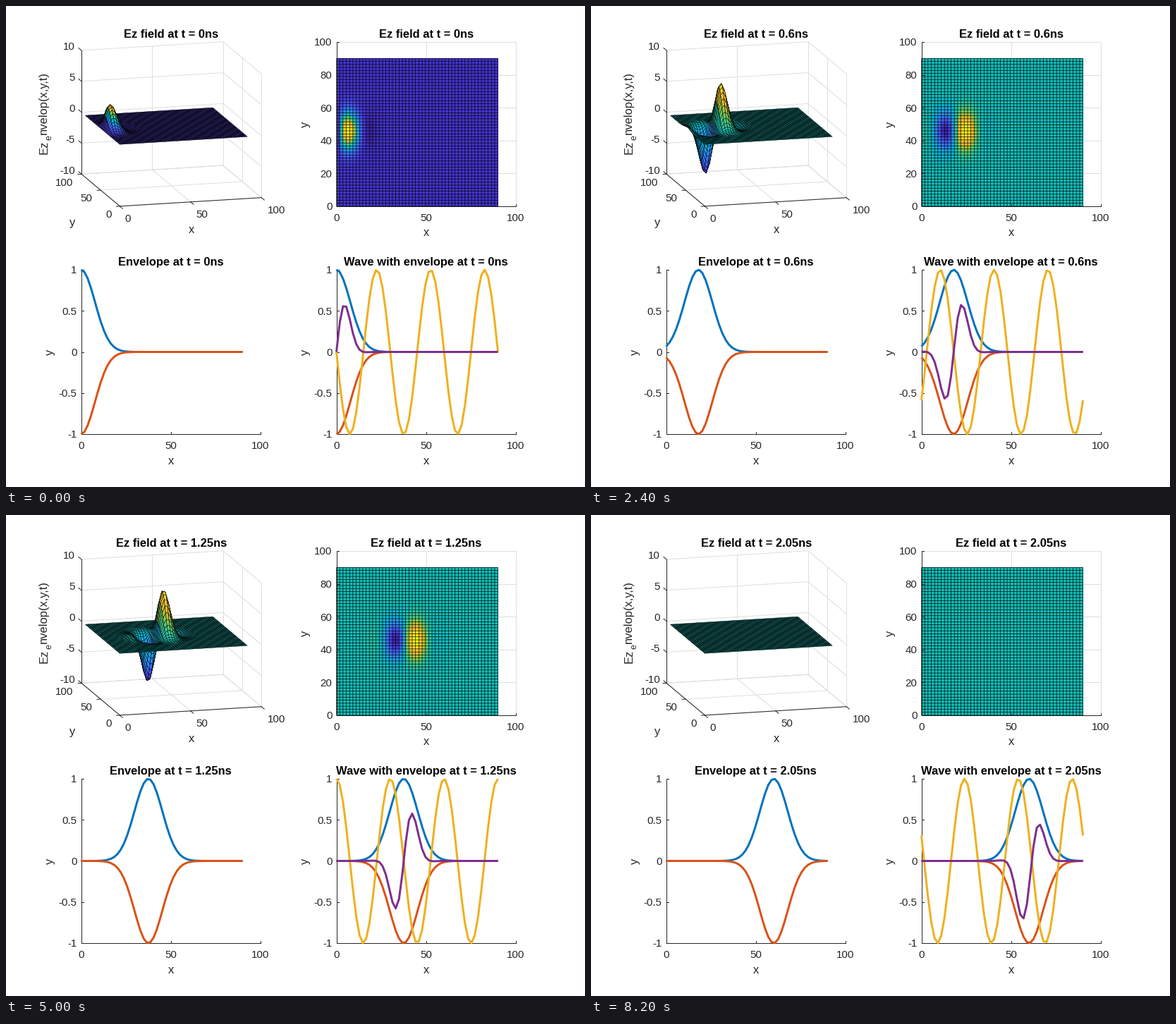
Write a matplotlib script that moves like this. It is 821x682 px and loops after 8.7 s.

```python
import numpy as np
import matplotlib.pyplot as plt
from matplotlib.animation import FuncAnimation
from matplotlib.collections import LineCollection, PolyCollection
from matplotlib.colors import LinearSegmentedColormap

W, H, DPI = 821, 682, 64
PT = 72 / DPI  # points per pixel
INK, GRID = "#262626", "#dedede"
BLUE, ORANGE, YELLOW, PURPLE = "#0072bd", "#d95319", "#edb120", "#7e2f8e"

STEPS, STEP_MS, LAST_MS, TICK_MS = 42, 200, 500, 100
SPEED, WAVELENGTH, WIDTH = 30, 30, 120
N = 50
x = np.linspace(0, 90, N)
X, Y = np.meshgrid(x, x)

parula = LinearSegmentedColormap.from_list("parula", [
    (0.242, 0.150, 0.660), (0.271, 0.215, 0.836), (0.281, 0.301, 0.941),
    (0.270, 0.389, 0.991), (0.196, 0.485, 0.989), (0.169, 0.570, 0.936),
    (0.125, 0.646, 0.888), (0.030, 0.708, 0.816), (0.070, 0.746, 0.725),
    (0.216, 0.784, 0.592), (0.391, 0.803, 0.435), (0.617, 0.788, 0.261),
    (0.820, 0.750, 0.154), (0.973, 0.730, 0.239), (0.989, 0.814, 0.189),
    (0.960, 0.901, 0.148), (0.977, 0.984, 0.081)])

plt.rcParams["font.family"] = "Liberation Sans"
fig = plt.figure(figsize=(W / DPI, H / DPI), dpi=DPI, facecolor="white")
ax = fig.add_axes([0, 0, 1, 1])
ax.set_xlim(0, W)
ax.set_ylim(H, 0)
ax.axis("off")


def segment(p, q, color=INK, z=2):
    ax.plot([p[0], q[0]], [p[1], q[1]], color=color, lw=PT, zorder=z)


def label(px, py, text, size=15, ha="center", **kw):
    kw.setdefault("color", INK)
    return ax.text(px, py, text, fontsize=size * PT, ha=ha, va="baseline",
                   rotation_mode="anchor", **kw)


def title(px, py):
    return label(px, py, "", 16.5, weight="bold", color="black")


class Panel:
    """Flat axes placed in pixel coordinates."""

    def __init__(self, left, top, ylim, yticks, grid=False):
        self.left, self.top, self.ylim = left, top, ylim
        self.w, self.h = 254.5, 233
        bottom, right = top + self.h, left + self.w
        for v in (0, 50, 100):
            px = self.px(v)
            if grid:
                segment((px, top), (px, bottom), GRID, 0)
            segment((px, bottom), (px, bottom - 3))
            label(px, bottom + 21, str(v))
        for v in yticks:
            py = self.py(v)
            if grid:
                segment((left, py), (right, py), GRID, 0)
            segment((left, py), (left + 3, py))
            label(left - 6, py + 5.4, f"{v:g}", ha="right")
        segment((left, top), (left, bottom))
        segment((left, bottom), (right, bottom))
        mid = left + self.w / 2
        label(mid, bottom + 42.5, "x", 16.5)
        label(left - 39.3, top + self.h / 2, "y", 16.5, rotation=90)
        self.title = title(mid, top - 6)

    def px(self, v):
        return self.left + np.asarray(v) * self.w / 100

    def py(self, v):
        lo, hi = self.ylim
        return self.top + (hi - np.asarray(v)) / (hi - lo) * self.h

    def line(self, color):
        return ax.plot([], [], color=color, lw=3 * PT, zorder=4,
                       solid_joinstyle="round", solid_capstyle="butt")[0]

    def plot(self, line, y):
        line.set_data(self.px(x), self.py(y))


def project(x, y, z):
    return (161.4 + 2.008 * x - 0.544 * y,
            196.2 - 0.122 * x - 0.456 * y - 8.77 * z)


def edge(p, q, color=INK, z=2):
    segment(project(*p), project(*q), color, z)


def tick(p, dx, dy):
    a, b = project(*p)
    segment((a, b), (a + dx, b + dy))


def draw_box():
    for v in (-10, -5, 0, 5, 10):
        edge((0, 100, v), (100, 100, v), GRID, 0)
        edge((100, 100, v), (100, 0, v), GRID, 0)
        tick((0, 100, v), -4, -3.4)
        a, b = project(0, 100, v)
        label(a - 9, b - 0.6, str(v), ha="right")
    for v in (0, 50, 100):
        edge((v, 0, -10), (v, 100, -10), GRID, 0)
        edge((v, 100, -10), (v, 100, 10), GRID, 0)
        edge((0, v, -10), (100, v, -10), GRID, 0)
        edge((100, v, -10), (100, v, 10), GRID, 0)
        tick((v, 0, -10), 4, 3.4)
        tick((0, v, -10), -5, 0.3)
        a, b = project(v, 0, -10)
        label(a + 6.5 + len(str(v)) * 4.9, b + 22.4, str(v))
        a, b = project(0, v, -10)
        label(a - 11.5, b + 16.4, str(v), ha="right")
    edge((0, 100, -10), (0, 100, 10))
    edge((0, 0, -10), (0, 100, -10))
    edge((0, 0, -10), (100, 0, -10))
    label(263, 322, "x", 16.5)
    label(94, 312, "y", 16.5)
    label(58.3, 190.5, "Ez", 16.5, ha="right", rotation=90)
    label(64.5, 190, "e", 12.5, ha="left", rotation=90)
    label(58.3, 182.5, "nvelop(x,y,t)", 16.5, ha="left", rotation=90)


draw_box()
title3d = title(234.5, 45)
top = Panel(468.5, 51, (0, 100), range(0, 101, 20), grid=True)
halves = (-1, -0.5, 0, 0.5, 1)
env_panel = Panel(106.5, 374, (-1, 1), halves)
wave_panel = Panel(468.5, 374, (-1, 1), halves)

surface = PolyCollection([], cmap=parula, edgecolors="black",
                         linewidths=0.5 * PT, joinstyle="round", zorder=3)
ax.add_collection(surface, autolim=False)

gx, gy = top.px(x), top.py(x)
mesh = ax.pcolormesh(gx, gy, np.zeros((N - 1, N - 1)), cmap=parula, zorder=1)
ax.set_xlim(0, W)
ax.set_ylim(H, 0)
rules = [[(v, gy[0]), (v, gy[-1])] for v in gx]
rules += [[(gx[0], v), (gx[-1], v)] for v in gy]
net = LineCollection(rules, colors="black", linewidths=0.65 * PT, zorder=2)
net.set_snap(False)
ax.add_collection(net, autolim=False)

env_lines = [env_panel.line(c) for c in (BLUE, ORANGE)]
wave_lines = [wave_panel.line(c) for c in (BLUE, ORANGE, YELLOW, PURPLE)]


def envelope(t):
    # the pulse halts at the end of its 2 ns run
    return np.exp(-(x - SPEED * min(t, 2)) ** 2 / WIDTH)


def wave(t):
    return np.sin(2 * np.pi * (SPEED * t - x) / WAVELENGTH)


def field(t):
    if t > 2.01:
        return np.zeros((N, N))
    gain = 10.3 * (1 - 0.45 * np.exp(-t / 0.17))
    across = np.exp(-(x - 45) ** 2 / WIDTH)
    return -gain * np.outer(across, envelope(t) * wave(t))


def quads(z):
    """Cells of the surface, farthest first."""
    p = np.stack(project(X, Y, z), axis=-1)
    cells = np.stack([p[:-1, :-1], p[:-1, 1:], p[1:, 1:], p[1:, :-1]], axis=2)
    return cells[::-1, ::-1].reshape(-1, 4, 2)


def update(i):
    step = min(i * TICK_MS // STEP_MS, STEPS - 1)
    t = step * 0.05
    env, w, z = envelope(t), wave(t), field(t)

    cells = z[:-1, :-1]
    lo, hi = (z.min(), z.max()) if z.any() else (-1, 1)
    surface.set_verts(quads(z))
    surface.set_array(cells[::-1, ::-1].ravel())
    surface.set_clim(lo, hi)
    mesh.set_array(cells)
    mesh.set_clim(lo, hi)

    for line, y in zip(env_lines, (env, -env)):
        env_panel.plot(line, y)
    for line, y in zip(wave_lines, (env, -env, w, -env ** 2 * w)):
        wave_panel.plot(line, y)

    when = f"at t = {t:g}ns"
    title3d.set_text(f"Ez field {when}")
    top.title.set_text(f"Ez field {when}")
    env_panel.title.set_text(f"Envelope {when}")
    wave_panel.title.set_text(f"Wave with envelope {when}")
    return []


loop_ms = (STEPS - 1) * STEP_MS + LAST_MS
anim = FuncAnimation(fig, update, frames=loop_ms // TICK_MS, interval=TICK_MS,
                     init_func=lambda: update(0), repeat=True, repeat_delay=0)
plt.show()
```
